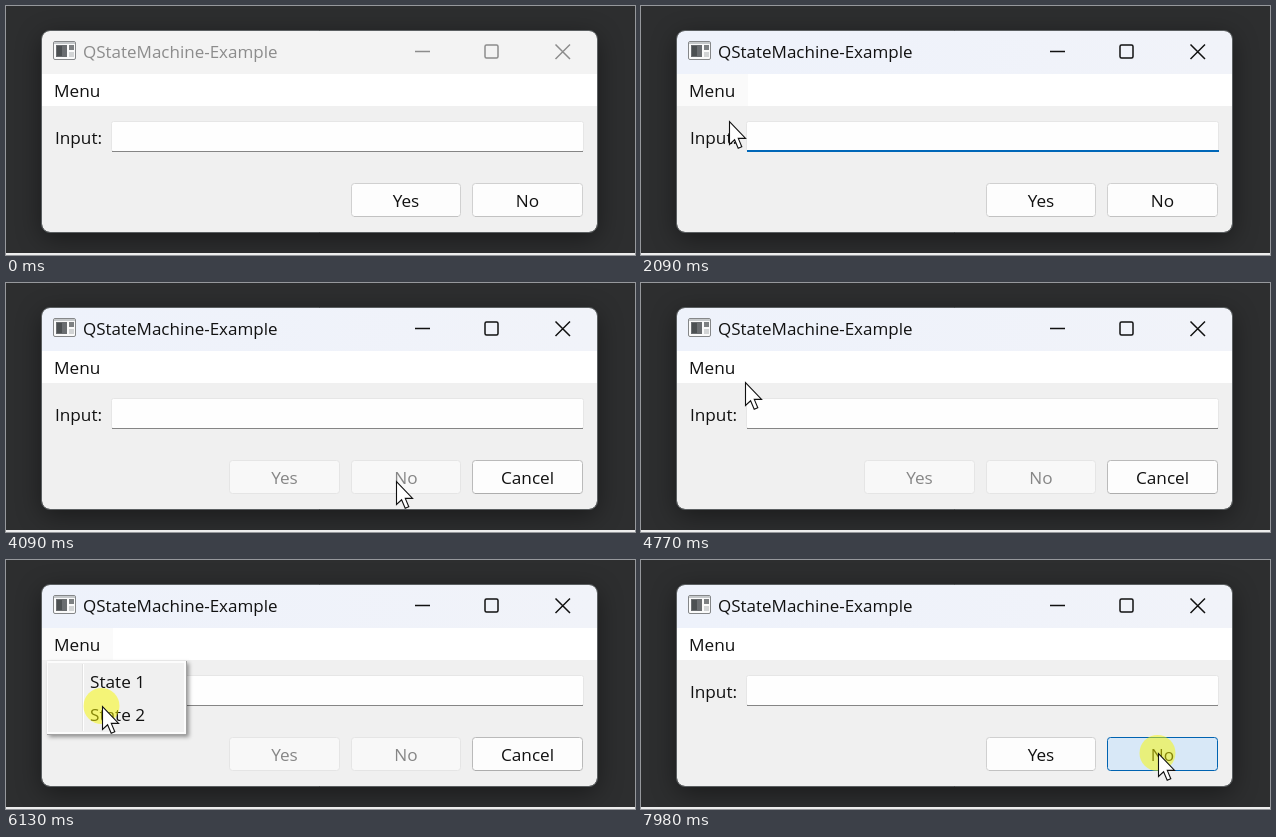
An HTML page with a canvas that plays this animation: 629x249 px, repeating every 8000 ms.

```html
<!DOCTYPE html>
<html lang="en">
<head>
<meta charset="utf-8">
<title>QStateMachine-Example</title>
<style>
  html, body { margin: 0; width: 100%; height: 100%; overflow: hidden; background: #2d2e2f; }
  canvas { display: block; }
</style>
</head>
<body>
<canvas id="stage" width="629" height="249"></canvas>
<script>
const ctx = document.getElementById('stage').getContext('2d');
const LOOP = 8000, STEP = 68.43, START = 590;
const FONT = '"Open Sans", "Noto Sans", sans-serif';

// Pointer path: time, x, y
const PATH = [
  [590, 23, 238], [1050, 80, 83], [1280, 80, 83], [1800, 88, 115],
  [2400, 88, 115], [3050, 294, 197], [3200, 294, 197], [3540, 510, 199],
  [3720, 510, 199], [3950, 390, 198], [4240, 390, 198], [4880, 77, 90],
  [5180, 77, 90], [5370, 77, 105], [5790, 97, 146], [5850, 96, 146],
  [6690, 96, 146], [7150, 430, 191], [7490, 430, 191], [7900, 517, 193]
];
const CLICKS = [[1210, 1350], [2020, 2090], [3050, 3195], [3560, 3700], [3950, 4085],
  [5040, 5180], [6130, 6200], [7160, 7420], [7910, 8000]];
const POPUPS = [[1350, 2090], [5180, 6200]];
const MENU_HOVER = [[1000, 2160], [4830, 6200]];
const FOCUS = [[1210, 3560], [6200, 7200]];
const CARET = [[2160, 2690], [3260, 3560], [6200, 6740]];
const THREE_BUTTONS = [[2160, 6200]];

const during = (spans, t) => spans.some(([a, b]) => t >= a && t < b);
const clamp = v => Math.max(0, Math.min(1, v));
const ease = v => v * v * (3 - 2 * v);
const fade = (t, on, off) => clamp((t - on) / 220) * (1 - clamp((t - off) / 220));
const mix = (a, b, k) => 'rgb(' + a.map((v, i) => Math.round(v + (b[i] - v) * k)) + ')';

function rect(x, y, w, h, color) {
  ctx.fillStyle = color;
  ctx.fillRect(x, y, w, h);
}

function round(x, y, w, h, r, fill, stroke) {
  ctx.beginPath();
  ctx.roundRect(x, y, w, h, r);
  if (fill) { ctx.fillStyle = fill; ctx.fill(); }
  if (stroke) { ctx.strokeStyle = stroke; ctx.lineWidth = 1; ctx.stroke(); }
}

function line(color, width, ...pts) {
  ctx.beginPath();
  for (const [x1, y1, x2, y2] of pts) { ctx.moveTo(x1, y1); ctx.lineTo(x2, y2); }
  ctx.strokeStyle = color;
  ctx.lineWidth = width;
  ctx.stroke();
}

function text(str, x, y, color = '#111', align = 'left', size = 17.2) {
  ctx.font = `${size}px ${FONT}`;
  ctx.textAlign = align;
  ctx.fillStyle = color;
  ctx.fillText(str, x, y);
}

function pointer(t) {
  const s = START + Math.floor((t - START + 18) / STEP) * STEP;
  const i = PATH.findIndex(p => p[0] > s);
  if (i === 0) return PATH[0].slice(1);
  if (i < 0) return PATH[PATH.length - 1].slice(1);
  const [t0, x0, y0] = PATH[i - 1], [t1, x1, y1] = PATH[i];
  const k = ease((s - t0) / (t1 - t0));
  return [Math.round(x0 + (x1 - x0) * k), Math.round(y0 + (y1 - y0) * k)];
}

function desktop() {
  rect(0, 0, 629, 249, '#2d2e2f');
  ctx.save();
  ctx.shadowColor = 'rgba(0,0,0,.45)';
  ctx.shadowBlur = 26;
  ctx.shadowOffsetY = 6;
  round(36, 25, 555, 201, 9, '#222');
  ctx.restore();
  rect(0, 247, 629, 2, '#ededed');
}

function titleBar(active) {
  const g = ctx.createLinearGradient(36, 0, 591, 0);
  g.addColorStop(0, active ? '#eef2fb' : '#f3f3f3');
  g.addColorStop(1, active ? '#f1f3f9' : '#f3f3f3');
  rect(35, 24, 558, 44, g);

  round(47.5, 35.5, 22, 18, 1.5, '#fafafa', '#858789');
  rect(48, 36, 21, 2, '#c5c8ca');
  rect(50, 39, 11, 12, '#6a6d70');
  rect(51, 40, 5, 10, '#4c5052');
  rect(63, 39, 5, 5, '#7d8082');
  rect(63, 46, 5, 5, '#d2d4d5');

  const ink = active ? '#111' : '#8c8c8c';
  text('QStateMachine-Example', 77, 52, ink, 'left', 17);
  line(ink, 1.3, [409, 45.5, 424, 45.5]);
  ctx.beginPath();
  ctx.roundRect(479, 39, 13, 13, 1.5);
  ctx.lineWidth = 1.5;
  ctx.stroke();
  line(ink, 1.5, [549.5, 38.5, 564, 53], [564, 38.5, 549.5, 53]);
}

function inputField(focused, caret) {
  text('Input:', 49, 138);
  round(105.5, 115.5, 472, 30, 2, '#fefefe', '#e6e6e6');
  if (focused) rect(106, 144, 472, 2, '#0067b8');
  else rect(106, 145, 471, 1, '#858585');
  if (caret) rect(112, 119, 1, 23, '#111');
}

function button(label, x, w, { enabled = true, hover = 0, press = 0, strong = false } = {}) {
  if (!enabled) {
    round(x + .5, 177.5, w - 1, 33, 3, '#f8f8f8', '#e5e5e5');
    text(label, x + w / 2, 201, '#868686', 'center');
    return;
  }
  const base = strong ? [186, 186, 186] : [208, 208, 208];
  const fill = press ? '#d8e8f7' : mix([253, 253, 253], [220, 236, 250], hover);
  const edge = press ? '#0063b1' : mix(base, [0, 103, 184], hover);
  round(x + .5, 177.5, w - 1, 33, 3, fill, edge);
  if (!hover) line(strong ? '#adadad' : '#c2c2c2', 1, [x + 3, 210.5, x + w - 3, 210.5]);
  text(label, x + w / 2, 201, '#111', 'center');
}

function buttons(t) {
  if (during(THREE_BUTTONS, t)) {
    button('Yes', 223, 111, { enabled: false });
    button('No', 345, 110, { enabled: false });
    button('Cancel', 466, 111, {
      hover: fade(t, 3450, 3860), press: +(t > 3560 && t < 3700), strong: true
    });
  } else {
    button('Yes', 345, 110, { hover: fade(t, 7070, 7560) });
    button('No', 466, 111, { hover: fade(t, 7720, 9000), press: +(t >= 7910) });
  }
}

function popup() {
  ctx.save();
  ctx.shadowColor = 'rgba(0,0,0,.4)';
  ctx.shadowBlur = 4;
  ctx.shadowOffsetX = ctx.shadowOffsetY = 2;
  rect(41, 101, 140, 74, '#a2a2a2');
  ctx.restore();
  rect(41, 101, 139, 73, '#fcfcfc');
  rect(42, 103, 136, 69, '#f0f0f0');
  rect(76, 104, 1, 67, '#e2e2e2');
  rect(77, 104, 1, 67, '#fff');
  text('State 1', 84, 128);
  text('State 2', 84, 161);
}

function highlight(x, y) {
  ctx.beginPath();
  ctx.arc(x - .5, y, 18, 0, Math.PI * 2);
  ctx.fillStyle = 'rgba(250,250,0,.5)';
  ctx.fill();
}

function arrow(x, y) {
  ctx.save();
  ctx.translate(x, y);
  const shape = new Path2D('M.5.5V23.5L5.6 18.8L9.2 27.3L12.8 25.7L9.3 17.4H16.6Z');
  ctx.fillStyle = '#fff';
  ctx.fill(shape);
  ctx.strokeStyle = '#111';
  ctx.lineWidth = 1.1;
  ctx.stroke(shape);
  ctx.restore();
}

function draw(t) {
  const active = t >= 1210;
  desktop();
  ctx.save();
  ctx.beginPath();
  ctx.roundRect(36, 25, 555, 201, 8);
  ctx.clip();
  rect(36, 25, 555, 201, '#f0f0f0');
  titleBar(active);
  rect(36, 68, 555, 32, '#fff');
  if (during(MENU_HOVER, t)) rect(36, 68, 71, 32, active ? '#fafafa' : '#f4f4f4');
  text('Menu', 48, 91);
  inputField(during(FOCUS, t), during(CARET, t));
  buttons(t);
  ctx.restore();
  round(35.5, 24.5, 556, 202, 8.5, null, '#5b5f61');

  if (during(POPUPS, t)) popup();
  if (t < START) return;
  const [x, y] = pointer(t);
  if (during(CLICKS, t)) highlight(x, y);
  arrow(x, y);
}

const origin = performance.now();
function tick() {
  draw((performance.now() - origin) % LOOP);
  requestAnimationFrame(tick);
}
tick();
</script>
</body>
</html>
```
